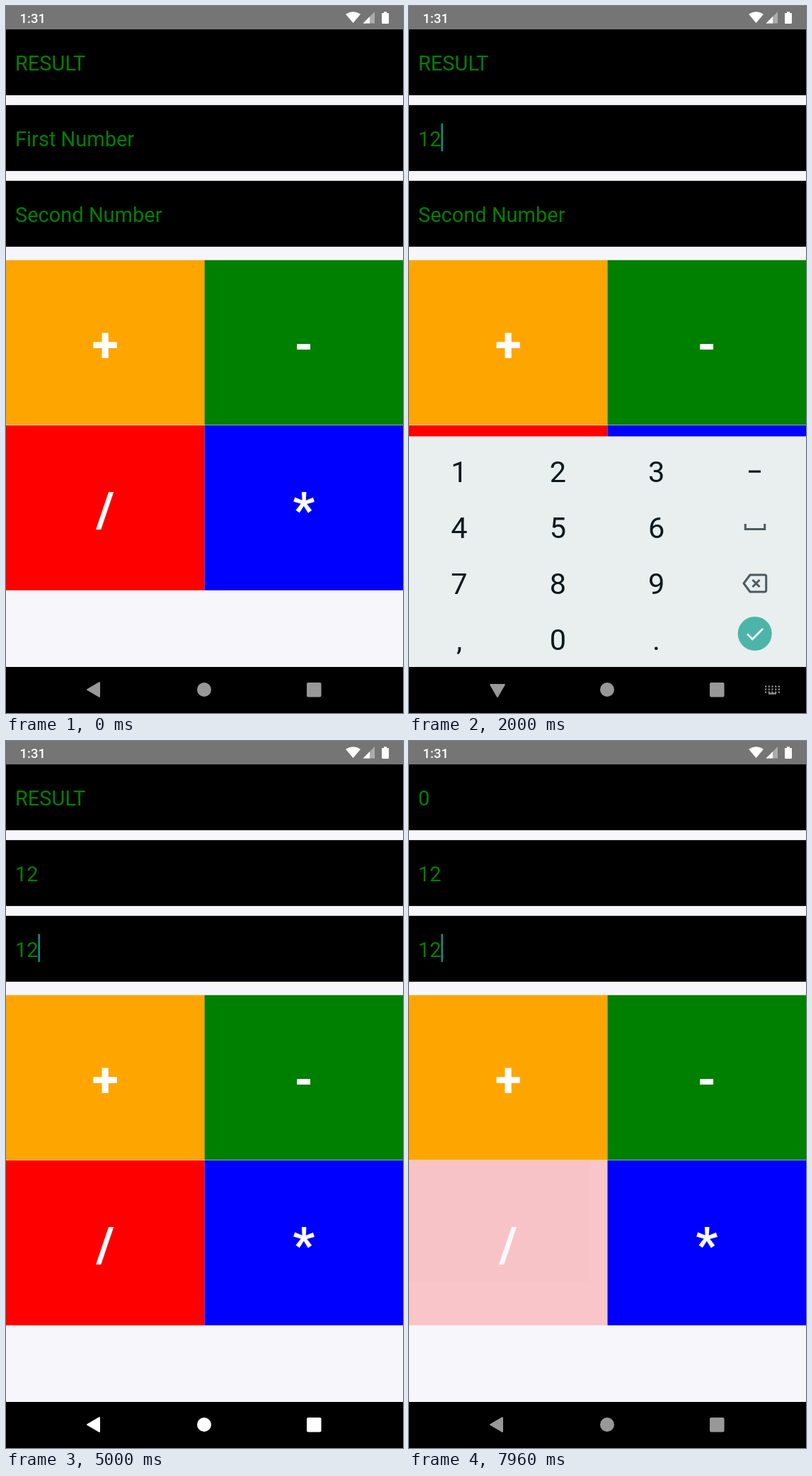
These frames come from a looping animation (561x998 px, 8 s). An HTML page:

```html
<!DOCTYPE html>
<html lang="en">
<head>
<meta charset="utf-8">
<title>Calculator</title>
<style>
  html, body { margin: 0; width: 100%; height: 100%; overflow: hidden; background: #f7f7fb; }
  svg { display: block; width: 561px; height: 998px; font-family: Roboto, sans-serif; }
  .field { font-size: 29px; fill: #008000; }
  .op { font-size: 68.5px; font-weight: 700; fill: #fff; text-anchor: middle; }
  .key { font-size: 41.5px; fill: #08191f; text-anchor: middle; }
  .clock { font-size: 18.5px; font-weight: 500; fill: #fff; }
  .line { fill: none; stroke: #4b5a62; stroke-width: 3; }
</style>
</head>
<body>
<svg viewBox="0 0 561 998">
  <rect width="561" height="998" fill="#f7f7fb"/>
  <g id="fields"></g>
  <rect id="cursor" width="2.6" height="39.5" fill="#0b8f83"/>
  <g id="buttons"></g>

  <g id="keyboard">
    <rect y="607.5" width="561" height="391" fill="#e9eeee"/>
    <g id="keys"></g>
    <rect x="480" y="655.5" width="17" height="3.2" fill="#08191f"/>
    <path class="line" d="M475.3 731v7.5h27.4V731"/>
    <path class="line" stroke-linejoin="round" d="M482 803h20.5q2.2 0 2.2 2.2v19.6q0 2.2-2.2 2.2H482L473 815zM485.5 810l10 10m0-10l-10 10"/>
    <circle cx="488.7" cy="886" r="24" fill="#4bb5aa"/>
    <path d="M478 886.5l7.3 7.3L500 879" fill="none" stroke="#fff" stroke-width="2.8"/>
  </g>

  <rect width="561" height="33" fill="#757575"/>
  <text class="clock" x="19.5" y="23.7">1:31</text>
  <g fill="#fff">
    <path d="M490.5 24L480 11.5Q490.5 4.500 501 11.500z"/>
    <path d="M504.500 24.500L521 8v16.500z" opacity=".4"/>
    <path d="M504.500 24.500L514 15v9.500z"/>
    <path d="M531 10h3V8h4v2h3v13.500q0 1.500-1.500 1.500h-7q-1.500 0-1.500-1.500z"/>
  </g>

  <rect y="933" width="561" height="65" fill="#000"/>
  <rect id="ripple" x="68" y="933" width="113.500" height="65" rx="32.500" fill="#1c1c1c"/>
  <g id="nav">
    <path id="back" d="M115 965L132 955.200V974.800z" stroke-width="2" stroke-linejoin="round"/>
    <circle cx="280" cy="965" r="10"/>
    <rect x="425" y="955" width="20.500" height="20.500" rx="2"/>
    <g id="ime"></g>
  </g>
</svg>
<script>
const LOOP = 8000;
const $ = id => document.getElementById(id);

function add(parent, tag, attrs, text = '') {
  const el = document.createElementNS('http://www.w3.org/2000/svg', tag);
  for (const k in attrs) el.setAttribute(k, attrs[k]);
  el.textContent = text;
  parent.appendChild(el);
  return el;
}

// Fields, each with its [time, text] steps
const fields = [
  [[0, 'RESULT'], [5620, '24'], [6440, '0']],
  [[0, 'First Number'], [1280, '1'], [1700, '12']],
  [[0, 'Second Number'], [3300, '1'], [3750, '12']]
].map((steps, i) => {
  const y = 33 + i * 106.9;
  add($('fields'), 'rect', { y, width: 561, height: 93, fill: '#000' });
  return { steps, el: add($('fields'), 'text', { class: 'field', x: 13, y: y + 58.2 }) };
});

// Buttons: label, colour, column, row, press time, release time
const buttons = [
  ['+', '#ffa500', 0, 0, 5440, 5595],
  ['-', '#008000', 1, 0, 6230, 6420],
  ['/', '#ff0000', 0, 1, 7820, 9000],
  ['*', '#0000ff', 1, 1, 9000, 9000]
].map(([label, fill, col, row, down, up]) => {
  const x = col * 280.5, y = 358.7 + row * 233.3;
  const el = add($('buttons'), 'g', {});
  add(el, 'rect', { x, y, width: 280.5, height: 232.8, fill });
  add(el, 'text', { class: 'op', x: x + 140.2, y: y + 143.4 }, label);
  return { el, down, up };
});

['123', '456', '789', ',0.'].forEach((row, r) => [...row].forEach((ch, c) =>
  add($('keys'), 'text', { class: 'key', x: 71 + c * 139.3, y: 672 + r * 79 }, ch)));

for (let i = 0; i < 15; i++) {
  add($('ime'), 'rect', { x: 503 + i % 5 * 4.7, y: 959.5 + Math.floor(i / 5) * 4, width: 2.2, height: 2.2 });
}
add($('ime'), 'rect', { x: 508, y: 969.5, width: 11, height: 2.2 });

// Cursor: start of a blink cycle, field, offset
const caret = [[420, 1, 0], [1280, 1, 15.7], [1700, 1, 32], [2700, 2, 0], [3300, 2, 15.7], [3750, 2, 32]];

const ramp = (t, a, b) => Math.min(1, Math.max(0, (t - a) / (b - a)));
const ease = p => p < .5 ? 2 * p * p : 1 - 2 * (1 - p) ** 2;
const out = p => 1 - (1 - p) ** 2;
const latest = (steps, t) => steps.filter(s => s[0] <= t).pop();
const set = (el, name, value) => el.setAttribute(name, value);

function render(t) {
  for (const f of fields) {
    const text = latest(f.steps, t)[1];
    if (f.el.textContent !== text) f.el.textContent = text;
  }

  const c = latest(caret, t);
  const lit = c && (t - c[0]) % 1000 < 500;
  set($('cursor'), 'opacity', lit ? 1 : 0);
  if (c) {
    set($('cursor'), 'x', 13.4 + c[2]);
    set($('cursor'), 'y', 59 + c[1] * 106.7);
  }

  for (const b of buttons) {
    const press = ease(ramp(t, b.down, b.down + 150));
    const release = ease(ramp(t, b.up, b.up + 250));
    set(b.el, 'opacity', 1 - .8 * press * (1 - release));
  }

  const shown = out(ramp(t, 780, 980)) * (1 - out(ramp(t, 4560, 4760)));
  set($('keyboard'), 'opacity', shown);
  set($('keyboard'), 'transform', `translate(0 ${(1 - shown) * 65})`);

  const turn = ease(ramp(t, 500, 700)) - ease(ramp(t, 4560, 4760));
  set($('back'), 'transform', `rotate(${-90 * turn} 125 965)`);
  set($('ime'), 'opacity', t >= 560 && t < 4600 ? 1 : 0);
  set($('ripple'), 'opacity', ramp(t, 4390, 4450) * (1 - ramp(t, 4540, 4800)));

  const glow = ramp(t, 4430, 4750) - ramp(t, 7020, 7960);
  const g = Math.round(152 + 103 * glow);
  set($('nav'), 'fill', `rgb(${g},${g},${g})`);
  set($('back'), 'stroke', `rgb(${g},${g},${g})`);
}

const start = performance.now();
function tick() {
  render((performance.now() - start) % LOOP);
  requestAnimationFrame(tick);
}
tick();
</script>
</body>
</html>
```
